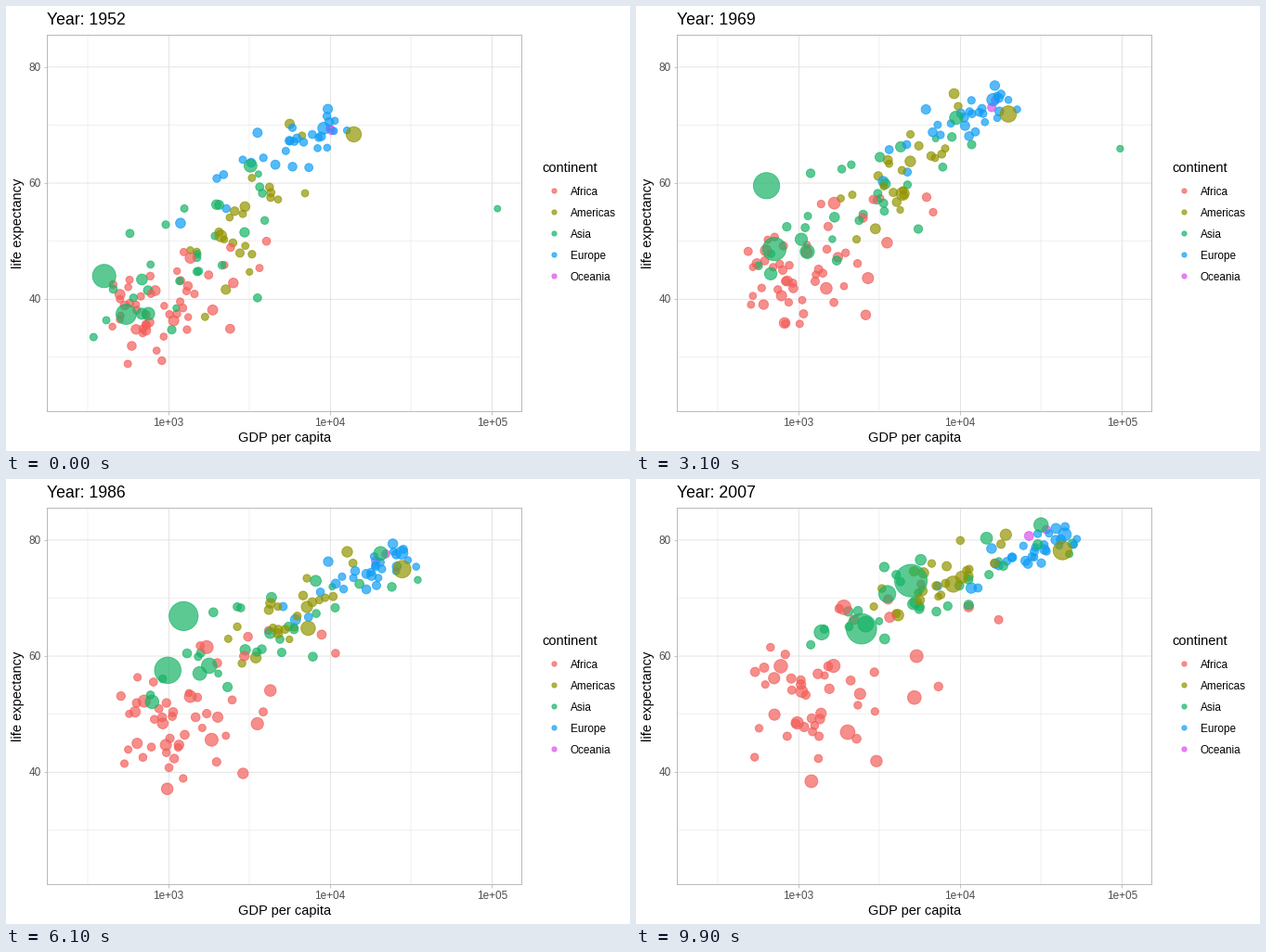
Animation, 672 px wide and 480 px high, one loop 10000 ms. Source, as a matplotlib script:

```python
import matplotlib.pyplot as plt
import numpy as np
from matplotlib.animation import FuncAnimation
from matplotlib.colors import to_rgba

W, H, DPI = 672, 480, 100
PX = 72 / DPI                      # points per pixel
FRAMES, INTERVAL, STEPS = 100, 100, 12
LEFT, RIGHT, TOP, BOTTOM = 44.3, 555.4, 31.2, 436.9
X0, DECADE = 175, 174.1            # pixel of 1e3, pixels per decade
Y80, UNIT = 65.8, 6.262            # pixel of 80, pixels per year of life
ALPHA = 0.7

COLORS = {
    "Africa": "#F35E5A",
    "Americas": "#929400",
    "Asia": "#17B366",
    "Europe": "#0E9DF5",
    "Oceania": "#DE4FF0",
}

# Count, skew of wealth, wealth-life correlation, population growth, then
# median log GDP, its spread, median life, its spread at start and end.
CROWD = {
    "Oceania": (2, .1, .7, 1.9, (4.01, .01, 69.2, .2), (4.47, .10, 80.7, .6)),
    "Africa": (50, .5, .45, 3.6, (2.93, .22, 39, 5), (3.13, .34, 54, 8.5)),
    "Americas": (23, .1, .7, 2.6, (3.47, .21, 53.5, 8), (3.9, .25, 73.6, 3.6)),
    "Asia": (26, .1, .7, 2.8, (3.10, .32, 47, 8.5), (3.8, .44, 71.2, 6)),
    "Europe": (30, -.4, .8, 1.35, (3.77, .25, 66, 4.4), (4.43, .21, 78, 2.7)),
}

# Population in millions (first, last), then evenly timed (GDP, life) stops.
LEADERS = [
    ("Africa", 33, 135, [(1077, 36.3), (1800, 45.2), (2014, 46.9)]),
    ("Americas", 57, 190, [(2109, 50.9), (6850, 62.5), (9066, 72.4)]),
    ("Asia", 47, 150, [(684, 37.5), (667, 48.5), (1391, 64.1)]),
    ("Asia", 556, 1319, [(400, 44), (502, 45.5), (655, 61.5), (845, 64.8),
                         (1465, 67.8), (2410, 70.7), (4959, 73)]),
    ("Asia", 372, 1110, [(547, 37.4), (675, 46.5), (820, 55), (1230, 60.5),
                         (2452, 64.7)]),
    ("Asia", 82, 224, [(750, 37.5), (1450, 54.6), (3541, 70.7)]),
    ("Asia", 86, 127, [(3217, 63), (18000, 76.2), (31656, 82.6)]),
    ("Asia", .2, 2.5, [(108382, 55.6), (97000, 66.6), (29000, 74.3),
                       (47307, 77.6)]),
    ("Asia", 41, 169, [(685, 43.4), (2606, 65.5)]),
    ("Americas", 158, 301, [(13990, 68.4), (24500, 74), (42952, 78.2)]),
]

rng = np.random.default_rng(7)
now = np.linspace(0, 1, FRAMES)
ease = now ** 0.75                 # fast gains early, slower later


def tween(stops):
    return np.interp(now, np.linspace(0, 1, len(stops)), stops)


def spread(n):
    """Evenly stratified, bell-shaped deviates in random order."""
    p = rng.permutation((np.arange(n) + 0.5) / n)
    return np.clip(np.log(p / (1 - p)) / 1.75, -1.9, 1.9)


def drift(old, new, jitter):
    """Eased path from old to new with small turns every five years."""
    return old + (new - old) * ease + tween(rng.normal(0, jitter, STEPS))


def crowd():
    dots = []
    for name, (n, skew, corr, growth, *ends) in CROWD.items():
        wealth, health = spread(n), spread(n)
        pops = np.clip(6 * np.exp(1.1 * rng.normal(size=n)), 0.1, 70)
        xs, ys = [], []
        for mx, sx, my, sy in ends:
            z = 0.95 * wealth + 0.3 * rng.normal(size=n)
            z = np.expm1(skew * np.clip(z, -1.9, 1.9)) / skew
            v = 0.9 * health + 0.4 * rng.normal(size=n)
            life = my + sy * (corr * z + np.sqrt(1 - corr ** 2) * v)
            xs.append(mx + sx * z)
            ys.append(np.minimum(life, my + 2.2 * sy))
        for x, y, p in zip(np.transpose(xs), np.transpose(ys), pops):
            dots.append((name, drift(*x, 0.02), drift(*y, 0.4),
                         tween(np.sqrt([p, p * growth]))))
    rng.shuffle(dots)
    return sorted(dots, key=lambda d: d[0] != "Oceania")


def leaders():
    for name, p0, p1, stops in LEADERS:
        gdp, life = np.transpose(stops)
        yield name, tween(np.log10(gdp)), tween(life), tween(np.sqrt([p0, p1]))


def collapse():
    """A lone African dot that plunges in the early nineties."""
    dip = 21 * np.maximum(0, 1 - abs(11 * now - 8) / 1.3)
    return "Africa", 2.7 + 0.23 * now, 40 + 6.2 * now - dip, 1.6 + 1.4 * now


def marker_area(size):
    """Squared marker diameter in points for a size in millimetres."""
    return (0.75 * (size * 72.27 / 25.4 + 0.945) * 96 / 72 * PX) ** 2


names, xs, ys, roots = zip(*crowd(), *leaders(), collapse())
offsets = np.stack([xs, ys], axis=-1)
areas = marker_area(2 + 10 * np.array(roots) / np.sqrt(1319))

plt.rcParams["font.family"] = "Liberation Sans"
fig = plt.figure(figsize=(W / DPI, H / DPI), dpi=DPI, facecolor="white")


def label(x, y, text, size, color="black", **kw):
    return fig.text(x / W, 1 - y / H, text, fontsize=size * PX, color=color,
                    va="baseline", **kw)


def tick(x, y):
    page.plot(x, y, color="#B3B3B3", lw=0.75 * PX, solid_capstyle="butt")


# Ticks and legend use pixel coordinates; the panel uses data units.
page = fig.add_axes((0, 0, 1, 1))
page.set(xlim=(0, W), ylim=(H, 0))
page.axis("off")

panel = fig.add_axes((LEFT / W, 1 - BOTTOM / H,
                      (RIGHT - LEFT) / W, (BOTTOM - TOP) / H))
panel.set(xlim=[3 + (x - X0) / DECADE for x in (LEFT, RIGHT)],
          ylim=[80 - (y - Y80) / UNIT for y in (BOTTOM, TOP)],
          xticks=[], yticks=[])
panel.patch.set_visible(False)
for spine in panel.spines.values():
    spine.set(color="#B3B3B3", linewidth=0.9 * PX, zorder=5)

for minor, width in ((0.5, 0.45), (0, 0.8)):
    style = dict(color="#DEDEDE", lw=width * PX, zorder=0.5)
    for k in range(3):
        panel.axvline(3 + k - minor, **style)
        panel.axhline(40 + 20 * (k - minor), snap=False, **style)

for k in range(3):
    x, y = X0 + DECADE * k, Y80 + 20 * UNIT * k
    tick([x, x], [BOTTOM, BOTTOM + 3.7])
    tick([LEFT - 3.7, LEFT], [y, y])
    label(x, 453, f"1e+{3 + k:02d}", 11.73, "#4D4D4D", ha="center")
    label(38, y + 4.1, str(80 - 20 * k), 11.73, "#4D4D4D", ha="right")

label(300, 470, "GDP per capita", 14.67, ha="center")
label(17.5, 234.5, "life expectancy", 14.67, ha="center",
      rotation=90, rotation_mode="anchor")
title = label(44, 20, "", 17.6)

label(577.5, 179, "continent", 14.67)
for i, (name, color) in enumerate(COLORS.items()):
    y = 199.2 + 23.04 * i
    rgba = to_rgba(color, ALPHA)
    page.scatter(589.5, y, s=marker_area(1.5), facecolor=[rgba],
                 edgecolor=[rgba], linewidth=0.945 * PX)
    label(608, y + 4.6, name, 11.73)

fills = [to_rgba(COLORS[n], ALPHA) for n in names]
bubbles = panel.scatter(*offsets[:, 0].T, s=areas[:, 0], facecolors=fills,
                        edgecolors=fills, linewidths=0.945 * PX, zorder=3)


def draw(frame):
    title.set_text(f"Year: {round(1952 + 55 * frame / (FRAMES - 1))}")
    bubbles.set_offsets(offsets[:, frame])
    bubbles.set_sizes(areas[:, frame])
    return bubbles, title


anim = FuncAnimation(fig, draw, frames=FRAMES, interval=INTERVAL,
                     repeat=True, repeat_delay=0)
plt.show()
```
